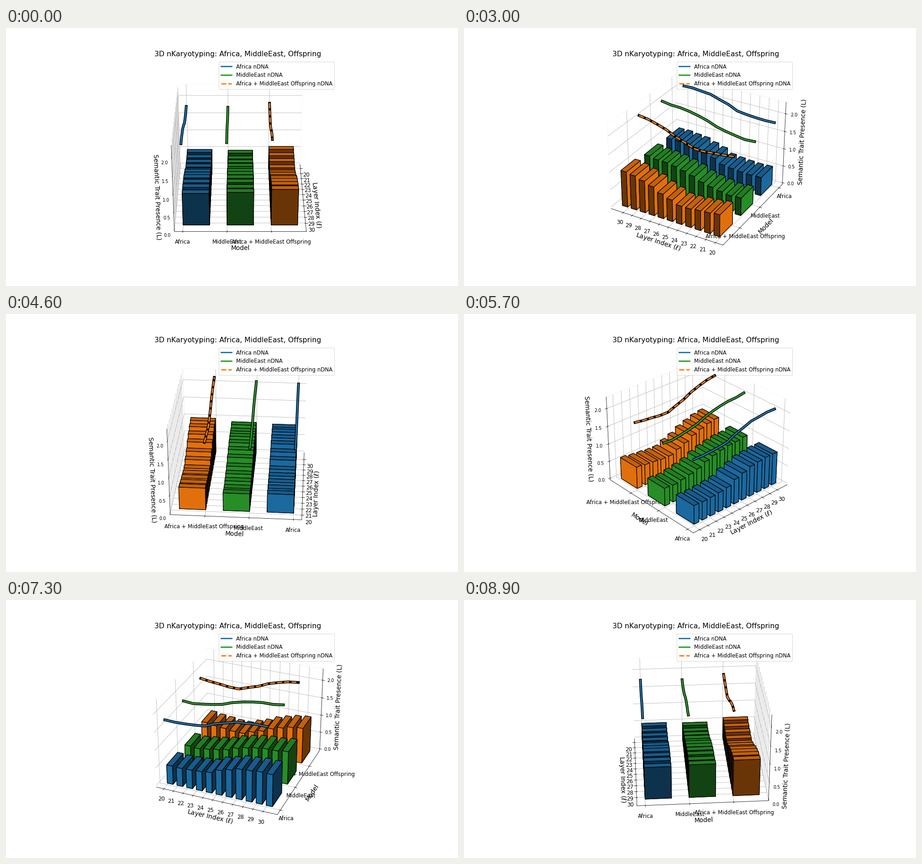
A matplotlib script for the animation above (9 s loop, 990 px wide and 566 px high).

```python
import matplotlib.pyplot as plt
import numpy as np
from matplotlib.animation import FuncAnimation

W, H = 990, 566
DPI = W / 14
FRAMES, INTERVAL = 90, 100
BAR = 0.6

layers = np.arange(20, 31)
models = [
    ("Africa", "#1f77b4", "-",
     [.527, .517, .528, .548, .580, .700, .773, .855, .877, .905, .897]),
    ("MiddleEast", "#2ca02c", "-",
     [.502, .482, .520, .564, .621, .722, .792, .846, .881, .888, .927]),
    ("Africa + MiddleEast Offspring", "#ff7f0e", "--",
     [.618, .579, .556, .524, .521, .614, .700, .823, .905, .975, 1.01]),
]
peak = max(max(m[3]) for m in models)
lift = 1.25 * peak


def padded(lo, hi, margin=0.05):
    """Data limits with the usual margin plus 1/48 on each side."""
    pad = (hi - lo) * margin
    lo, hi = lo - pad, hi + pad
    edge = (hi - lo) / 48
    return lo - edge, hi + edge


fig = plt.figure(figsize=((W + 0.01) / DPI, (H + 0.01) / DPI), dpi=DPI,
                 facecolor="white")
ax = fig.add_subplot(projection="3d")

for row, (name, color, style, values) in enumerate(models):
    z = np.array(values)
    ys = np.full(len(layers), float(row))
    ax.bar3d(layers, ys, np.zeros(len(layers)), BAR, BAR, z,
             color=color, edgecolor="black", linewidth=1.2, shade=True)
    ax.plot(layers, ys, z + lift, color="black", linewidth=6, zorder=100)
    ax.plot(layers, ys, z + lift, color=color, linewidth=3, linestyle=style,
            zorder=101, label=f"{name} nDNA")

ax.set_xlim(*padded(layers[0], layers[-1] + BAR))
ax.set_ylim(*padded(0, len(models) - 1 + BAR))
ax.set_zlim(*padded(0, peak + lift, margin=0))

ax.set_xticks(layers)
ax.set_yticks(range(len(models)), [m[0] for m in models])
ax.set_zticks(np.arange(0, 2.1, 0.5))
ax.tick_params(axis="x", labelsize=12)
ax.tick_params(axis="y", labelsize=12)
ax.tick_params(axis="z", labelsize=10)

ax.set_xlabel(r"Layer Index ($\ell$)", fontsize=14)
ax.set_ylabel("Model", fontsize=14)
ax.set_zlabel("Semantic Trait Presence (L)", fontsize=14)
ax.set_title("3D nKaryotyping: Africa, MiddleEast, Offspring", fontsize=16)
ax.legend(loc="upper right", fontsize=12)

for axis in (ax.xaxis, ax.yaxis, ax.zaxis):
    axis.pane.fill = False


def update(i):
    ax.view_init(elev=30, azim=i * 360 / FRAMES)
    return []


anim = FuncAnimation(fig, update, frames=FRAMES, interval=INTERVAL,
                     init_func=lambda: update(0), repeat=True, repeat_delay=0)
plt.show()
```
